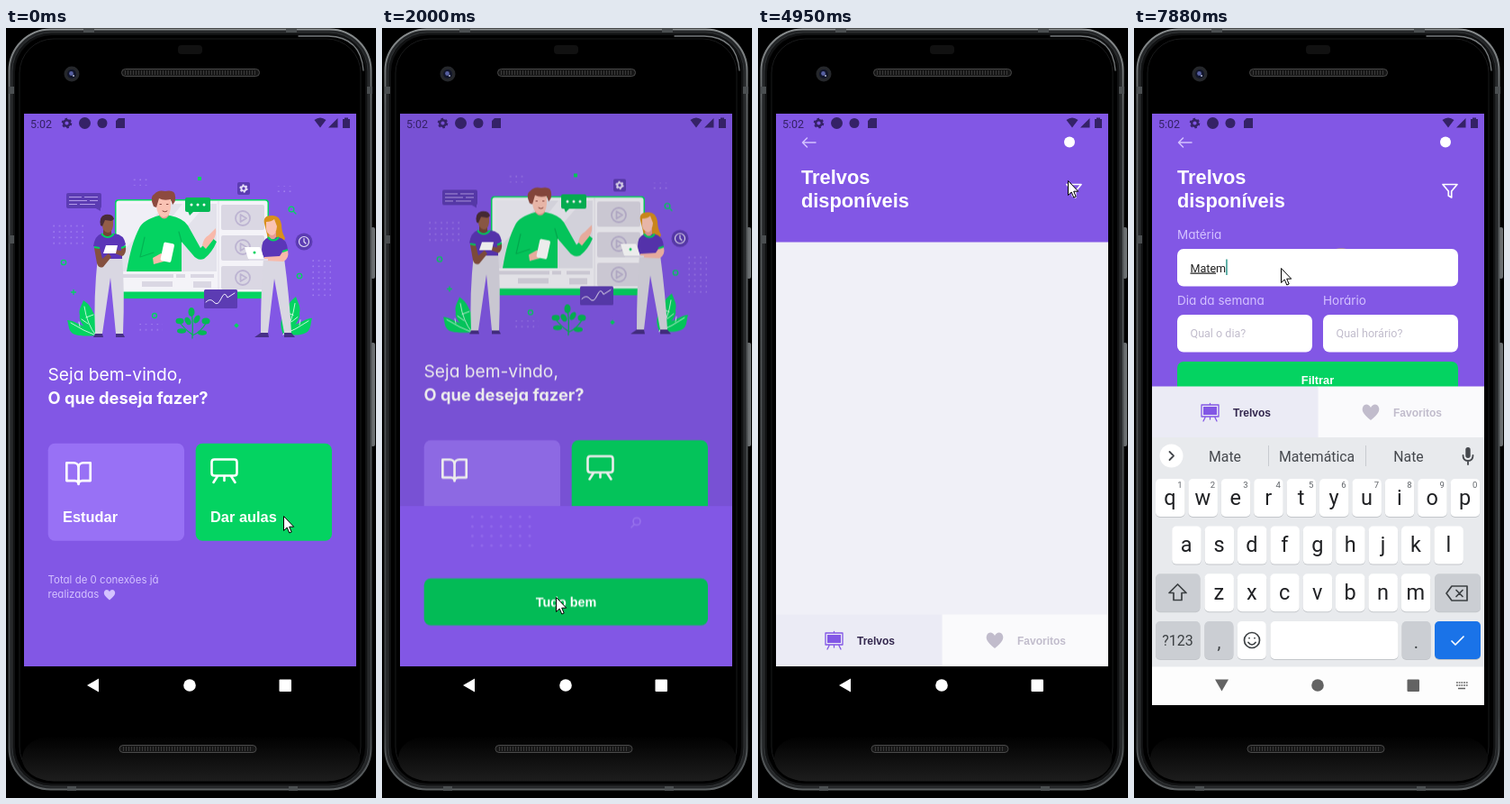
Write an HTML page that moves like this. It is 411 px wide and 854 px high and loops after 8 s.

```html
<!DOCTYPE html>
<html lang="pt">
<head>
<meta charset="utf-8">
<title>App de aulas</title>
<style>
html,body{margin:0;width:100%;height:100%;overflow:hidden;background:#000}
svg{display:block;width:411px;height:854px}
text{font-family:Roboto,sans-serif}
.soft{font-family:Inter,sans-serif;font-feature-settings:"cv11"}
.bold{font-family:"Liberation Sans",Arial,sans-serif;font-weight:700}
.mid{text-anchor:middle}
.line{fill:none;stroke-linecap:round;stroke-linejoin:round}

/* 1% = 80 ms */
.sheet,.card,.home,.shade,.cursor{animation:8s linear infinite}
.sheet{--d:613px}
.card{--d:-588px}
.landing{animation-name:landing}
.study{animation-name:study}
.home{animation-name:home}
.shade{animation-name:shade}
.cursor{animation-name:cursor}
.step{opacity:0;animation:8s step-end infinite}
@keyframes landing{
  0%,5.0625%{transform:translateY(var(--d));animation-timing-function:cubic-bezier(.35,.45,0,1)}
  10.375%,23.55%{transform:translateY(0);animation-timing-function:cubic-bezier(.35,.45,0,1)}
  28.8625%,100%{transform:translateY(var(--d))}
}
@keyframes study{
  0%,45.79%{transform:translateY(var(--d));animation-timing-function:cubic-bezier(.35,.45,0,1)}
  51.1%,100%{transform:translateY(0)}
}
@keyframes home{
  0%,5.0625%,28.8625%,45.79%{transform:translateY(0);animation-timing-function:cubic-bezier(.35,.45,0,1)}
  10.375%,23.55%{transform:translateY(-12.26px);animation-timing-function:cubic-bezier(.35,.45,0,1)}
  51.1%,100%{transform:translateY(-12.26px)}
}
@keyframes shade{
  0%,5.0625%{opacity:0}
  5.95%,24.8%{opacity:.1;animation-timing-function:cubic-bezier(.1,.6,.3,1)}
  28.8625%,45.79%{opacity:0}
  46.6%,100%{opacity:.1}
}
@keyframes cursor{
  0%,12.5%{transform:translate(308px,541px)}
  16.375%,29.75%{transform:translate(193px,631px)}
  30.75%{transform:translate(179px,636px)}
  34.625%{transform:translate(114px,514px)}
  36.75%,52.25%{transform:translate(114px,513px)}
  54.375%{transform:translate(190px,390px)}
  57%{transform:translate(330px,200px)}
  58.5%{transform:translate(391px,154px)}
  60%{transform:translate(368px,162px)}
  61.875%,65.7%{transform:translate(344px,169px)}
  66.625%,73.6%{transform:translate(346px,171px)}
  74.5%,77.25%{transform:translate(347px,188px)}
  83%,83.875%{transform:translate(230px,259px)}
  86.875%,100%{transform:translate(163px,266px)}
}
@keyframes ring{
  0%,2%,22.125%,41.5%,69.5%,75.375%,83.875%,100%{opacity:0}
  1%,21.125%,40.5%,68.5%,74.5%,83%{opacity:.47}
}
@keyframes pressTeach{0%,6%,100%{opacity:0}3.875%{opacity:.1}}
@keyframes pressOk{0%,30%,100%{opacity:0}22.125%{opacity:.11}}
@keyframes pressStudy{0%,43.375%,100%{opacity:0}41.375%{opacity:.1}}
@keyframes form{0%{opacity:0}77.25%,100%{opacity:1}}
@keyframes stain{0%{opacity:0}83%,100%{opacity:.3}}
@keyframes caret{0%{opacity:0;transform:translateX(0)}87.875%{opacity:1;transform:translateX(0)}
  94.6%{opacity:1;transform:translateX(11px)}95.6%{opacity:1;transform:translateX(18px)}
  96.6%{opacity:1;transform:translateX(22px)}97.5%{opacity:1;transform:translateX(28.7px)}
  98.5%,100%{opacity:1;transform:translateX(39.5px)}}
@keyframes typed{0%{clip-path:inset(0 100% 0 0)}94.6%{clip-path:inset(0 29px 0 0)}95.6%{clip-path:inset(0 21.7px 0 0)}
  96.6%{clip-path:inset(0 17.5px 0 0)}97.5%{clip-path:inset(0 11px 0 0)}98.5%,100%{clip-path:inset(0)}}
@keyframes hint{0%{opacity:1}94.6%,100%{opacity:0}}
@keyframes kbIcon{0%{opacity:0}89.75%,100%{opacity:1}}
@keyframes navLight{0%{opacity:0}91.875%,100%{opacity:1}}
@keyframes tabs{0%{transform:translateY(0)}92.875%,100%{transform:translateY(-253px)}}
@keyframes board{0%,91.25%{transform:translateY(260px);animation-timing-function:ease-out}93.125%,100%{transform:translateY(0)}}
.tabs{animation:tabs 8s step-end infinite}
.board{animation:board 8s linear infinite}
.typed{animation:typed 8s step-end infinite}
</style>
</head>
<body>
<svg viewBox="0 0 411 854" xmlns="http://www.w3.org/2000/svg">
<defs>
  <clipPath id="screen"><rect x="20" y="95" width="369" height="613"/></clipPath>
  <clipPath id="keyArea"><rect x="20" y="454" width="369" height="255"/></clipPath>
  <linearGradient id="rim" x2="0" y2="1"><stop stop-color="#8b8f90"/><stop offset=".1" stop-color="#5c6062"/><stop offset=".9" stop-color="#3b3f41"/><stop offset="1" stop-color="#5d6163"/></linearGradient>
  <linearGradient id="foot" x2="0" y2="1"><stop stop-color="#000"/><stop offset="1" stop-color="#1d1d1d"/></linearGradient>
  <pattern id="dots" width="6.4" height="6.4" patternUnits="userSpaceOnUse"><circle cx="2" cy="2" r=".8" fill="#a485f0"/></pattern>
  <pattern id="bigDots" width="10.6" height="10.6" patternUnits="userSpaceOnUse"><circle cx="5" cy="5" r="1.4" fill="#9d79f0"/></pattern>
  <path id="heart" d="M0 9C-9 2-10-2-9-5C-7-10-2-9 0-5C2-9 7-10 9-5C10-2 9 2 0 9Z"/>
  <g id="play" class="line" stroke="#bdb4d2" stroke-width="1.8"><circle r="8"/><path d="M-2.5-4L4 0L-2.5 4Z"/></g>
  <g id="gear"><circle r="3.3" fill="none" stroke="currentColor" stroke-width="2.4"/><circle r="4.8" fill="none" stroke="currentColor" stroke-width="2" stroke-dasharray="2.5 2.53"/></g>
  <g id="bush">
    <path d="M0 0C-4-8-9-9-15-11C-21-13-26-17-32-17C-30-11-31-7-27-3C-22 1-11 1 0 0Z" fill="#04d361"/>
    <path d="M0 0C5-10 2-17-1-22C-5-28-5-33-14-39C-16-33-20-29-18-22C-20-15-10-6 0 0Z" fill="#04d361"/>
    <path class="line" d="M0 0Q-10-12-13-32M0 0Q-14-5-28-14M-9-13l-7-5m5-2l8-3m-15 13l-1-5" stroke="#e9fff2" stroke-width=".8"/>
  </g>
  <g id="nav"><circle cx="204" cy="729" r="6.8"/><rect x="303.5" y="722.5" width="13.5" height="13.5" rx="1"/></g>
  <g id="kb"><path d="M358 726h1.8m.9 0h1.8m.9 0h1.8m.9 0h1.8m.9 0h1.8M358 729h1.8m.9 0h1.8m.9 0h1.8m.9 0h1.8m.9 0h1.8M360 732.5h8" fill="none" stroke="currentColor" stroke-width="1.6"/></g>
</defs>

<!-- phone body -->
<g fill="#6c7072">
  <rect x="405" y="221" width="5" height="57" rx="2"/><rect x="405" y="349" width="5" height="115" rx="2"/>
</g>
<rect x="3.5" y="1.5" width="402" height="843" rx="46" fill="#232527" stroke="url(#rim)" stroke-width="2"/>
<rect x="7" y="5" width="395" height="836" rx="43" fill="#111213" stroke="#303335"/>
<rect x="10" y="8" width="389" height="830" rx="41" fill="#000"/>
<rect x="15" y="12" width="379" height="823" rx="38" fill="#000" stroke="#191a1b"/>
<rect x="18" y="785" width="375" height="50" rx="34" fill="url(#foot)"/>
<path class="line" d="M325 9H358Q394 10 397 47" stroke="#777b7d" stroke-width="1.3"/>
<g fill="#4b4f51"><path d="M3 65h6v8H3zM3 230h6v9H3zM401 65h6v8h-6zM68 841h10v5H68zM314 841h10v5h-10zM86 1h12v4H86zM311 1h12v4h-12z"/></g>
<rect x="191" y="19" width="27" height="10" rx="4" fill="#111"/>
<circle cx="73" cy="51" r="8.5" fill="#25272b"/><circle cx="73" cy="51" r="5" fill="#111529"/><circle cx="72.5" cy="50.5" r="2.4" fill="#565fa0"/><circle cx="75" cy="53" r="1" fill="#b5bad9"/>
<g fill="#161616" stroke="#4a4a4a"><rect x="128.5" y="45.5" width="153" height="8" rx="4"/><rect x="126" y="795.5" width="152" height="8" rx="4"/></g>
<path d="M132 49.5H278M130 799.5H274" stroke="#3a3a3a" stroke-width="5" stroke-dasharray="1 2"/>

<g clip-path="url(#screen)">
<rect x="20" y="95" width="369" height="613" fill="#8257e5"/>

<!-- home -->
<g class="home">
  <rect x="20" y="95" width="369" height="640" fill="#8257e5"/>
  <g fill="url(#dots)"><path d="M50 217h36v23H50zM139 165h20v10h-20zM301 175h19v11h-19zM337 257h24v43h-24zM144 328h30v10h-30z"/></g>
  <g fill="#04d361"><rect x="213" y="165" width="4" height="4"/><rect x="254" y="328" width="4" height="4" transform="rotate(45 256 330)"/></g>
  <g class="line" stroke="#04d361" stroke-width="1.3"><circle cx="64" cy="260" r="2.7"/><circle cx="326" cy="275" r="2.7"/><circle cx="165" cy="319" r="2.5"/><circle cx="317" cy="201" r="2.9"/><path d="M319.5 203.5l2.5 2.5M72.5 293h5M75 290.5v5"/></g>

  <rect x="67" y="183" width="39" height="17" rx="2" fill="#5c3cb3"/><path d="M98 199h7v4z" fill="#5c3cb3"/>
  <path d="M70 187.5h14m3 0h15M70 191.5h20m3 0h9M70 195.5h9m3 0h17" stroke="#b39be9"/>
  <rect x="257" y="171" width="14" height="14" rx="2" fill="#5c3cb3"/><use href="#gear" color="#e5def7" transform="translate(264 178) scale(.8)"/>
  <circle cx="331" cy="237" r="9.5" fill="#5c3cb3"/><g class="line" stroke="#e5def7" stroke-width="1.2"><circle cx="331" cy="237" r="5.5"/><path d="M331 233.5v3.500l2 2"/></g>

  <rect x="121" y="190" width="171" height="110" rx="4" fill="#04d361"/>
  <rect x="122.500" y="191.500" width="168" height="101" rx="3" fill="#f4f3f8"/>
  <rect x="126" y="195" width="108" height="75" fill="#f0eff6"/><path d="M234 195V270H158L223 195zM126 252V270H136L196 195H178z" fill="#e3e2eb"/>
  <path d="M236 192v100" stroke="#e2e0ea"/>
  <g fill="#dad7e3"><rect x="239" y="196" width="48" height="28" rx="2"/><rect x="239" y="230" width="48" height="28" rx="2"/><rect x="239" y="264" width="48" height="26" rx="2"/><path d="M130 273h56v4h-56zM151 281h34v6h-34zM189 273h10v4h-10zM205 273h26v4h-26zM208 281h20v7h-20z"/></g>
  <use href="#play" x="263" y="211"/><use href="#play" x="263" y="243"/><use href="#play" x="263" y="277"/>

  <!-- tutor on the screen -->
  <path d="M134 270Q139 239 148 222Q152 213 170 208H182Q197 211 202 219L216 244 228 232 234 237Q229 249 220 256Q213 259 207 251L195 237V270z" fill="#04d361"/>
  <path class="line" d="M154 232L149 254 164 249M195 237L192 226" stroke="#03b353" stroke-width="1.2"/>
  <path d="M170 202h11v6q-5 7-11 0z" fill="#e79d95"/><path d="M167 186h16v13q-1 11-8 11-7-2-8-12z" fill="#fac3b4"/>
  <path d="M164 198Q159 187 165 184Q169 179 177 181Q188 179 188 187Q189 192 185 196L183 190Q175 192 170 189L167 199z" fill="#8d4a3f"/>
  <path class="line" d="M174 203q3 2 5 0M171 195.500h1.500m6 0h1.500" stroke="#8a463e"/>
  <path d="M218 241q2-9 7-11l8-8q1 8-3 13l-8 10zM163 255l9-5 6 3-3 6-11 3z" fill="#f8b9aa"/>
  <rect x="173" y="238" width="12" height="21" rx="2" fill="#fff" transform="rotate(12 178 250)"/>
  <rect x="199" y="188" width="28" height="16" rx="2" fill="#04b955"/><path d="M202 203h7l-5 5z" fill="#04b955"/>
  <g fill="#fff"><circle cx="206" cy="196" r="1.500"/><circle cx="213" cy="196" r="1.500"/><circle cx="220" cy="196" r="1.500"/></g>

  <use href="#bush" transform="translate(100 341)"/><use href="#bush" transform="translate(308 340) scale(-1 1.08)"/>
  <path class="line" d="M207 344Q208 326 206 315M207 340Q198 334 191 324M207 341Q216 338 223 326" stroke="#04b955" stroke-width="1.300"/>
  <g fill="#04b955"><ellipse cx="206" cy="315" rx="3.500" ry="5"/><ellipse cx="193" cy="325" rx="4.500" ry="3.300"/><ellipse cx="222" cy="325" rx="4.500" ry="3.500"/><ellipse cx="202" cy="325" rx="3" ry="4.500" transform="rotate(-30 202 325)"/><ellipse cx="212" cy="323" rx="3" ry="5" transform="rotate(30 212 323)"/><ellipse cx="195" cy="336" rx="5" ry="2.800"/><ellipse cx="218" cy="338" rx="5" ry="2.800"/></g>
  <rect x="220" y="290" width="37" height="21" rx="1.500" fill="#5c3cb3"/>
  <path class="line" d="M222 304q5-5 9 0t8-4t7-1l8-5" stroke="#f2eefc"/>

  <!-- student -->
  <path d="M102 253H129Q132 290 130 339H122L116 277 107 339H99Q97 300 102 253z" fill="#d9d7e2"/>
  <path d="M99 339h8l1 4H97zM122 339h8l2 4h-10z" fill="#473087"/>
  <path d="M97 242q2-12 9-14h15q10 1 12 12l-4 4V256H103V245z" fill="#5b36b8"/>
  <path d="M98 244h6l3 12 7-6 3 4-9 11q-5 2-7-4zM128 244l5-2q1 9-4 11l-8-3 1-4 6 1z" fill="#85503f"/>
  <path d="M98 243l6 1m24 0l5-2M106 228q7 8 14 0" fill="none" stroke="#04d361" stroke-width="2"/>
  <path d="M108 220h9v9q-4 4-9 0z" fill="#744535"/><path d="M107 211h12v8q-1 8-6 8-6-1-6-9z" fill="#935d48"/>
  <path d="M105 219q-2-10 5-12 9-1 10 5l-3 2-7-1-3 7z" fill="#4a2c37"/>
  <path d="M111 241h13l-2 9h-14z" fill="#fff"/>

  <!-- teacher -->
  <path d="M286 255H309Q315 300 317 338H309L298 278 291 338H283Q283 292 286 255z" fill="#d9d7e2"/>
  <path d="M283 338h8l1 5h-16zM309 338h8l4 5h-12z" fill="#473087"/>
  <path d="M287 217Q285 208 295 208Q304 207 306 218Q306 226 310 233Q308 240 300 236L291 233z" fill="#d9901d"/>
  <path d="M284 246q0-12 8-14h11q9 2 10 14l-5 3 1 8H286z" fill="#5b36b8"/>
  <path d="M293 226h7v6q-4 5-8 0z" fill="#e79d95"/><path d="M289 215q6 0 9-3l3 8q-1 10-6 10-6-2-6-8z" fill="#fac3b4"/>
  <path d="M308 247l5-1q2 10-5 13l-21-1v-4l17-1zM279 257l6-4 2 5z" fill="#f8b9aa"/>
  <path d="M291 232q6 7 12 0M307 248l6-2" fill="none" stroke="#04d361" stroke-width="2"/>
  <path d="M265 243h17l5 13h-18z" fill="#fff"/><path d="M270 256h21v2h-21z" fill="#e1deea"/><circle cx="276" cy="249" r="1.500" fill="#04d361"/>

  <g fill="#fff"><text class="soft" x="46.500" y="391" font-size="19.200">Seja bem-vindo,</text><text class="soft" x="46.500" y="417" font-size="18.300" font-weight="700">O que deseja fazer?</text></g>
  <rect x="46.700" y="460.800" width="151.300" height="108" rx="7.500" fill="#9871f5"/><rect x="210.700" y="460.800" width="151.300" height="108" rx="7.500" fill="#04d361"/>
  <g class="line" stroke="#fff">
    <path transform="translate(64.700 478.300) scale(1.320)" d="M2 3h6a4 4 0 0 1 4 4v14a3 3 0 0 0-3-3H2zM22 3h-6a4 4 0 0 0-4 4v14a3 3 0 0 1 3-3h7z" stroke-width="2"/>
    <path d="M231.500 478.500h22q3 0 3 3v12q0 3-3 3h-22q-3 0-3-3v-12q0-3 3-3zM235 497l-4.500 7m19.500-7l4.500 7M242.500 497v5" stroke-width="2.600"/>
  </g>
  <g fill="#fff" font-size="16.400"><text class="bold" x="63" y="547.500">Estudar</text><text class="bold" x="227" y="547.500">Dar aulas</text></g>
  <g fill="#d4c2ff" font-size="11.500"><text class="soft" x="46.500" y="616">Total de 0 conexões já</text><text class="soft" x="46.500" y="632">realizadas</text><use href="#heart" transform="translate(115 628.500) scale(.66)"/></g>
  <rect class="step" style="animation-name:pressTeach" x="210.700" y="460.800" width="151.300" height="108" rx="7.500"/>
  <rect class="step" style="animation-name:pressStudy" x="46.700" y="460.800" width="151.300" height="108" rx="7.500"/>
</g>
<rect class="shade" x="20" y="95" width="369" height="613"/>

<!-- teach invitation -->
<g class="sheet landing" clip-path="url(#screen)"><g class="card landing">
  <rect x="20" y="60" width="369" height="680" fill="#8257e5"/>
  <g opacity=".6"><path d="M98 519h69v43H98zM259 427h20v24h-20zM290 234h22v26h-22z" fill="url(#bigDots)"/><path d="M125 459l3-5 3 5z" fill="#9d79f0"/><g class="line" stroke="#a585f2" stroke-width="1.600"><circle cx="283" cy="529.500" r="4"/><path d="M280 533l-3 3"/></g></g>
  <g fill="#fff" font-size="28.500"><text class="bold" x="46.500" y="300">Quer ser</text><text class="bold" x="46.500" y="331.500">um Trelvo?</text></g>
  <g fill="#d4c2ff" font-size="15.100"><text class="soft" x="46.500" y="376">Para começar, você precisa se cadastrar</text><text class="soft" x="46.500" y="396.500">como professor na nossa plataforma web.</text></g>
  <rect x="46.700" y="592.700" width="315.300" height="52" rx="7.500" fill="#04d361"/>
  <rect class="step" style="animation-name:pressOk" x="46.700" y="592.700" width="315.300" height="52" rx="7.500"/>
  <text class="bold mid" x="204.500" y="624" font-size="14.400" fill="#fff">Tudo bem</text>
</g></g>

<!-- teacher list -->
<g class="sheet study" clip-path="url(#screen)"><g class="card study">
  <rect x="20" y="60" width="369" height="680" fill="#f0f0f7"/>
  <rect x="20" y="60" width="369" height="177.500" fill="#8257e5"/>
  <path class="line" d="M64 127H49.500m5-5l-5 5 5 5" stroke="#d4c2ff" stroke-width="1.500"/>
  <circle cx="346" cy="126.500" r="6" fill="#fff"/>
  <g fill="#fff" font-size="21.800"><text class="bold" x="48" y="172.500">Trelvos</text><text class="bold" x="48" y="198.500">disponíveis</text></g>
  <path class="line" d="M343 173.500h16l-6.300 7.500v7l-3.400-2v-5z" stroke="#fff" stroke-width="1.700"/>
  <g class="step" style="animation-name:form">
    <rect x="20" y="237" width="369" height="206.500" fill="#8257e5"/>
    <g fill="#d4c2ff" font-size="13.500"><text class="soft" x="48" y="234">Matéria</text><text class="soft" x="48" y="307">Dia da semana</text><text class="soft" x="210" y="307">Horário</text></g>
    <circle class="step" style="animation-name:stain" cx="230" cy="259" r="15" fill="#ff0"/>
    <g fill="#fff"><rect x="48" y="245" width="312" height="41.500" rx="7"/><rect x="48" y="318" width="150" height="41.500" rx="7"/><rect x="210" y="318" width="150" height="41.500" rx="7"/></g>
    <g fill="#c1bccc" font-size="12.550"><text class="step" style="animation-name:hint" x="62.500" y="270.500">Qual a matéria?</text><text x="62.500" y="343">Qual o dia?</text><text x="224.500" y="343">Qual horário?</text></g>
    <g class="typed"><text x="62.500" y="270.500" font-size="12.550" fill="#222"><tspan text-decoration="underline">Mate</tspan>m</text></g>
    <rect class="step" style="animation-name:caret" x="62.500" y="256.500" width="1.600" height="17.500" fill="#138a7d"/>
    <rect x="48" y="370" width="312" height="41.500" rx="7" fill="#04d361"/>
    <text class="bold mid" x="204" y="395" font-size="12.800" fill="#fff">Filtrar</text>
  </g>
  <g class="tabs">
    <rect x="20" y="650.500" width="185" height="90" fill="#ebebf5"/><rect x="204.500" y="650.500" width="185" height="90" fill="#fafafc"/>
    <rect x="77" y="673" width="15" height="9" fill="#8257e5"/>
    <path class="line" d="M75 671h19v13H75zM84.500 671v-1.500M79 685l-2 4m13-4l2 4M84.500 685v2" stroke="#8257e5" stroke-width="1.300"/>
    <use href="#heart" x="263" y="679" fill="#c1bccc"/>
    <g font-size="12"><text class="bold" x="110" y="683.500" fill="#32264d">Trelvos</text><text class="bold" x="288" y="683.500" fill="#c1bccc">Favoritos</text></g>
  </g>
</g></g>

<!-- status bar -->
<g fill="#352267" color="#352267">
  <text x="27" y="110.500" font-size="12.500">5:02</text>
  <use href="#gear" x="67.500" y="105.500"/><circle cx="87.500" cy="105.500" r="6.500"/><circle cx="107" cy="105.500" r="5.500"/>
  <path d="M122 103l3-3h7v11h-10zM342.500 102q6.500-5 13 0l-6.500 8.500zM358 110.500h10.500V100zM374 101h2v-1.500h4V101h2v10h-8z"/>
</g>
</g>

<!-- keyboard -->
<g clip-path="url(#keyArea)"><g class="board">
  <rect x="20" y="454" width="369" height="256" fill="#e8eaed"/>
  <circle cx="41.500" cy="474.500" r="13" fill="#fff"/>
  <path d="M149.500 463v23M257.500 463v23" stroke="#c8cbd0"/>
  <g class="mid" font-size="15.800" fill="#45484d"><text x="101" y="480.500">Mate</text><text x="203" y="480.500">Matemática</text><text x="305" y="480.500">Nate</text></g>
  <g class="line" stroke="#45484d" stroke-width="1.800"><path d="M39.500 470l4.500 4.500-4.500 4.500M365.500 474q0 6 5.500 6t5.500-6M371 480v4"/></g>
  <rect x="368.300" y="465" width="5.400" height="12" rx="2.700" fill="#45484d"/>
  <g id="keys"></g>
  <g class="line" stroke="#3c4043" stroke-width="1.700"><path d="M48.500 617l-9.500 9.500h5v8h9v-8h5zM353 619h17v16h-17l-6-8zM358 623.500l7 7m0-7l-7 7"/><circle cx="131" cy="679" r="8.500"/><path d="M127 681.500q4 5 8 0M128 676.500v.2m6-.2v.2"/><path d="M353 680l4 4 9-9" stroke="#fff"/></g>
  <g class="mid" fill="#3c4043"><text x="48.500" y="685" font-size="16">?123</text><text x="94.500" y="688" font-size="20">,</text><text x="313.500" y="688" font-size="20">.</text></g>
</g></g>

<!-- navigation bar -->
<g fill="#fff" color="#fff"><path d="M90 729l13-7.500v15z"/><use href="#nav"/><use class="step" style="animation-name:kbIcon" href="#kb"/></g>
<g class="step" style="animation-name:navLight" fill="#636363" color="#636363"><rect x="20" y="708.500" width="369" height="42.500" fill="#fdfdfd"/><path d="M90 722.500h15l-7.500 13z"/><use href="#nav"/><use href="#kb"/></g>

<g class="cursor"><circle class="step" style="animation-name:ring" r="15" fill="#ff0"/><path d="M.5.500V16.500l3.700-3.500 2.600 6 2.400-1-2.500-5.800h5z" fill="#fff" stroke="#000"/></g>
</svg>
<script>
const key = (x, y, w, fill) => `<rect x="${x}" y="${y + 1}" width="${w}" height="42" rx="5" fill="#c3c6ca"/><rect x="${x}" y="${y}" width="${w}" height="42" rx="5" fill="${fill}"/>`;
const label = (x, y, size, fill, t) => `<text class="mid" x="${x}" y="${y}" font-size="${size}" fill="${fill}">${t}</text>`;
const starts = [24, 42.2, 78.4];
let out = '';
['qwertyuiop', 'asdfghjkl', 'zxcvbnm'].forEach((row, r) => [...row].forEach((c, i) => {
  const x = starts[r] + i * 36.4, y = 500 + r * 52.6;
  out += key(x, y, 32.5, '#fff') + label(x + 16, y + 28.5, 23.5, '#202124', c);
  if (!r) out += label(x + 27, y + 10, 9.5, '#5f6368', (i + 1) % 10);
}));
const gray = '#cbced3';
out += key(24, 605.2, 49.5, gray) + key(334, 605.2, 51, gray) + key(24, 658, 49.5, gray)
  + key(78.4, 658, 32, gray) + key(114.8, 658, 32, '#fff') + key(151.5, 658, 142, '#fff')
  + key(297.5, 658, 32, gray) + key(334, 658, 51, '#1a73e8');
document.getElementById('keys').innerHTML = out;
</script>
</body>
</html>
```
